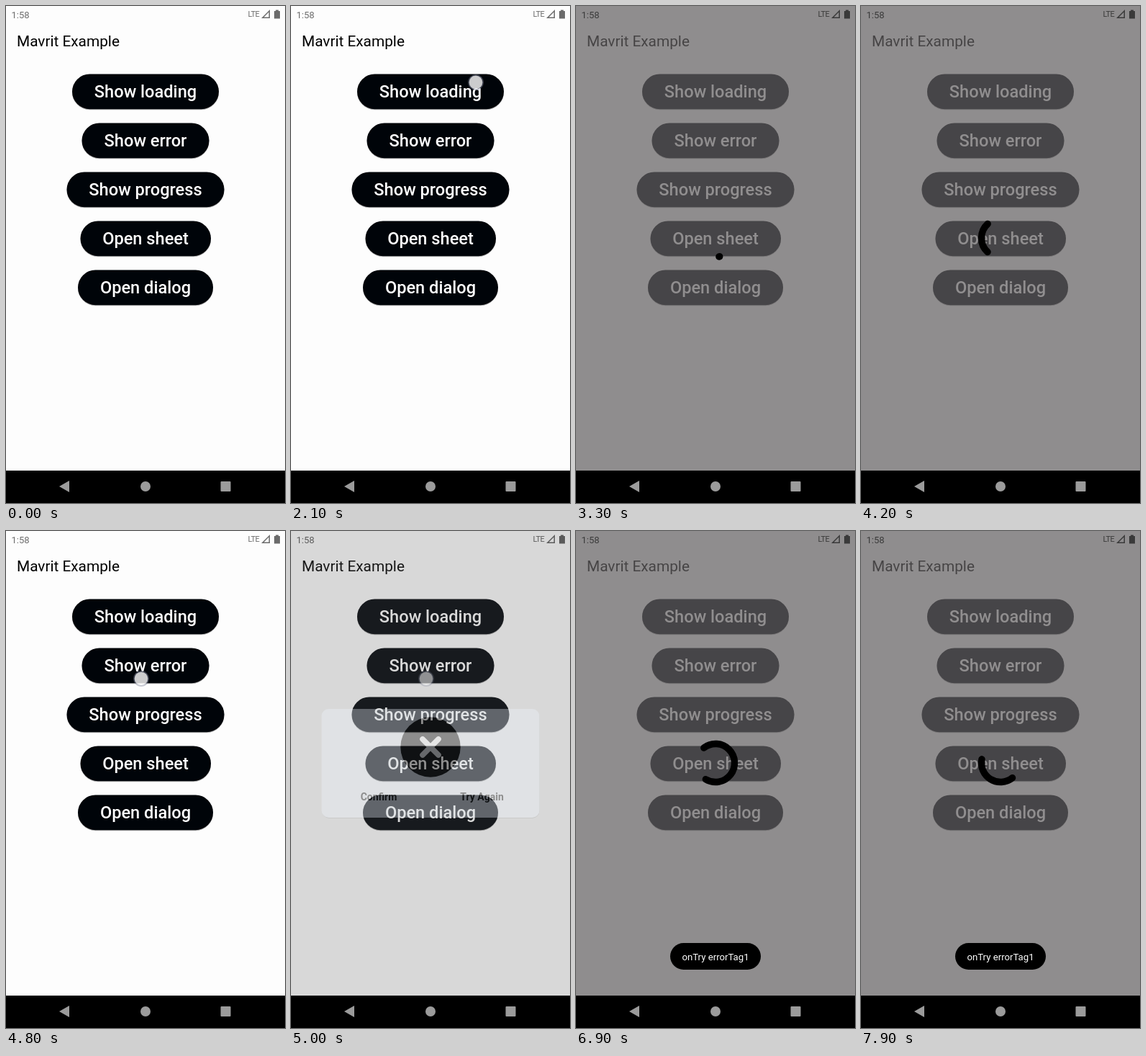
Write an HTML page that moves like this. It is 388 px wide and 690 px high and loops after 8 s.

```html
<!DOCTYPE html>
<html lang="en">
<head>
<meta charset="utf-8">
<title>Loading states</title>
<style>
  html, body { margin: 0; width: 100%; height: 100%; overflow: hidden; background: #fdfdfd; }
  svg { display: block; width: 100%; height: 100%; font-family: Roboto, sans-serif; }
  .button rect { fill: #000409; filter: drop-shadow(0 1px .6px rgba(0, 0, 0, .3)); }
  .button text { fill: #fff; font-size: 23.6px; font-weight: 500; }
  .center, .button text { text-anchor: middle; }
  .label { font-size: 14px; font-weight: 700; }
</style>
</head>
<body>
<svg viewBox="0 0 388 690">
  <rect width="388" height="690" fill="#fdfdfd"/>
  <text x="15" y="56" font-size="20.8">Mavrit Example</text>
  <g id="buttons"></g>
  <rect id="dim" width="388" height="645" fill="#636162"/>

  <g id="status">
    <text x="7.5" y="16.5" font-size="13">1:58</text>
    <text x="336.5" y="15.3" font-size="11" letter-spacing="-.5">LTE</text>
    <path d="M355 17 L367 5 V17 Z M358.6 15.5 H365.5 V8.6 Z" fill-rule="evenodd"/>
    <path d="M373 7 h2 v-1.5 h4 v1.5 h2 v10.5 h-8 z"/>
  </g>

  <path id="spinner" fill="none" stroke="#000" stroke-width="9.5" stroke-linecap="round"/>

  <g id="dialog">
    <rect x="43" y="247.8" width="302.5" height="151" rx="10" fill="#000" opacity=".25"/>
    <rect x="42.5" y="247" width="303" height="151" rx="10" fill="#f0f7fe"/>
    <circle cx="194" cy="300" r="41.7"/>
    <path d="M183 289 L205 311 M205 289 L183 311" stroke="#fff" stroke-width="7.6" stroke-linecap="round"/>
    <text class="label center" x="122" y="374">Confirm</text>
    <text class="label center" x="265.5" y="374">Try Again</text>
  </g>

  <g id="toast">
    <rect x="131" y="572" width="126" height="37" rx="18.5"/>
    <text class="center" x="194" y="595.5" font-size="13.2" fill="#fff">onTry errorTag1</text>
  </g>

  <g id="touch">
    <circle r="9.5" fill="#fff" fill-opacity=".8"/>
    <circle r="10" fill="none" stroke="#7c8096" stroke-opacity=".42" stroke-width="2"/>
  </g>

  <rect y="645" width="388" height="45"/>
  <g fill="#9b9b9b">
    <path d="M74 667 L88 659 V675 Z"/>
    <circle cx="194" cy="667" r="7"/>
    <rect x="298.5" y="660" width="14" height="14" rx="1"/>
  </g>
</svg>
<script>
const LOOP = 8000;
const $ = id => document.getElementById(id);
const clamp = x => Math.min(1, Math.max(0, x));
const ramp = (t, from, to) => clamp((t - from) / (to - from));
const show = (id, opacity) => $(id).setAttribute('opacity', opacity);

const buttons = [
  ['Show loading', 92, 296], ['Show error', 105.5, 282.5], ['Show progress', 84.5, 303.5],
  ['Open sheet', 103.5, 285], ['Open dialog', 100, 288]
];
$('buttons').innerHTML = buttons.map(([label, left, right], i) => `
  <g class="button" transform="translate(0 ${94.5 + 68 * i})">
    <rect x="${left}" width="${right - left}" height="48.7" rx="24.35"/>
    <text x="194" y="32">${label}</text>
  </g>`).join('');

// Cubic Bezier (.4, 0, .2, 1), solved for x by bisection.
function ease(x) {
  x = clamp(x);
  let low = 0, high = 1;
  for (let i = 0; i < 20; i++) {
    const s = (low + high) / 2, r = 1 - s;
    if (1.2 * r * r * s + .6 * r * s * s + s ** 3 < x) low = s; else high = s;
  }
  return low * low * (3 - 2 * low);
}

const CYCLE = 1350, HALF = 667, SPIN = .289;

// The arc turns steadily while its head, then its tail, advances by 250 degrees.
function spinnerPath(time, base) {
  const turn = Math.floor(time / CYCLE), phase = time - turn * CYCLE;
  const head = ease(phase / HALF), tail = ease((phase - HALF) / HALF);
  const start = base + SPIN * time + 250 * (turn + tail) + 10;
  const sweep = Math.max(.1, 250 * (head - tail));
  const point = degrees => {
    const a = degrees * Math.PI / 180;
    return `${194 + 26.5 * Math.cos(a)} ${322 + 26.5 * Math.sin(a)}`;
  };
  return `M${point(start)} A26.5 26.5 0 ${sweep > 180 ? 1 : 0} 1 ${point(start + sweep)}`;
}

const touches = [
  { x: 257, y: 106, down: 2100, up: 2250, gone: 2400 },
  { x: 188, y: 205, down: 4800, up: 5000, gone: 5200 },
  { x: 259, y: 354, down: 6300, up: 6400, gone: 6500 }
];

function draw(t) {
  const loading = ramp(t, 2150, 2300) - ramp(t, 4250, 4400);
  const failing = ramp(t, 4950, 5100);
  const closing = ramp(t, 6350, 6500);
  const dim = loading + failing;

  show('dim', .708 * dim);
  const grey = Math.round(108 - 50 * dim);
  $('status').setAttribute('fill', `rgb(${grey},${grey},${grey})`);
  show('dialog', failing - closing);
  show('toast', ramp(t, 6450, 6650));

  const retry = t > 6400;
  show('spinner', retry ? ramp(t, 6400, 6500) : loading);
  $('spinner').setAttribute('d', retry ? spinnerPath(t - 6301, 49) : spinnerPath(t - 1915, 137));

  const touch = touches.find(p => t >= p.down && t < p.gone);
  show('touch', touch ? (t < touch.up ? 1 : .65) : 0);
  if (touch) $('touch').setAttribute('transform', `translate(${touch.x} ${touch.y})`);
}

const began = performance.now();
function frame() {
  draw((performance.now() - began) % LOOP);
  requestAnimationFrame(frame);
}
frame();
</script>
</body>
</html>
```
